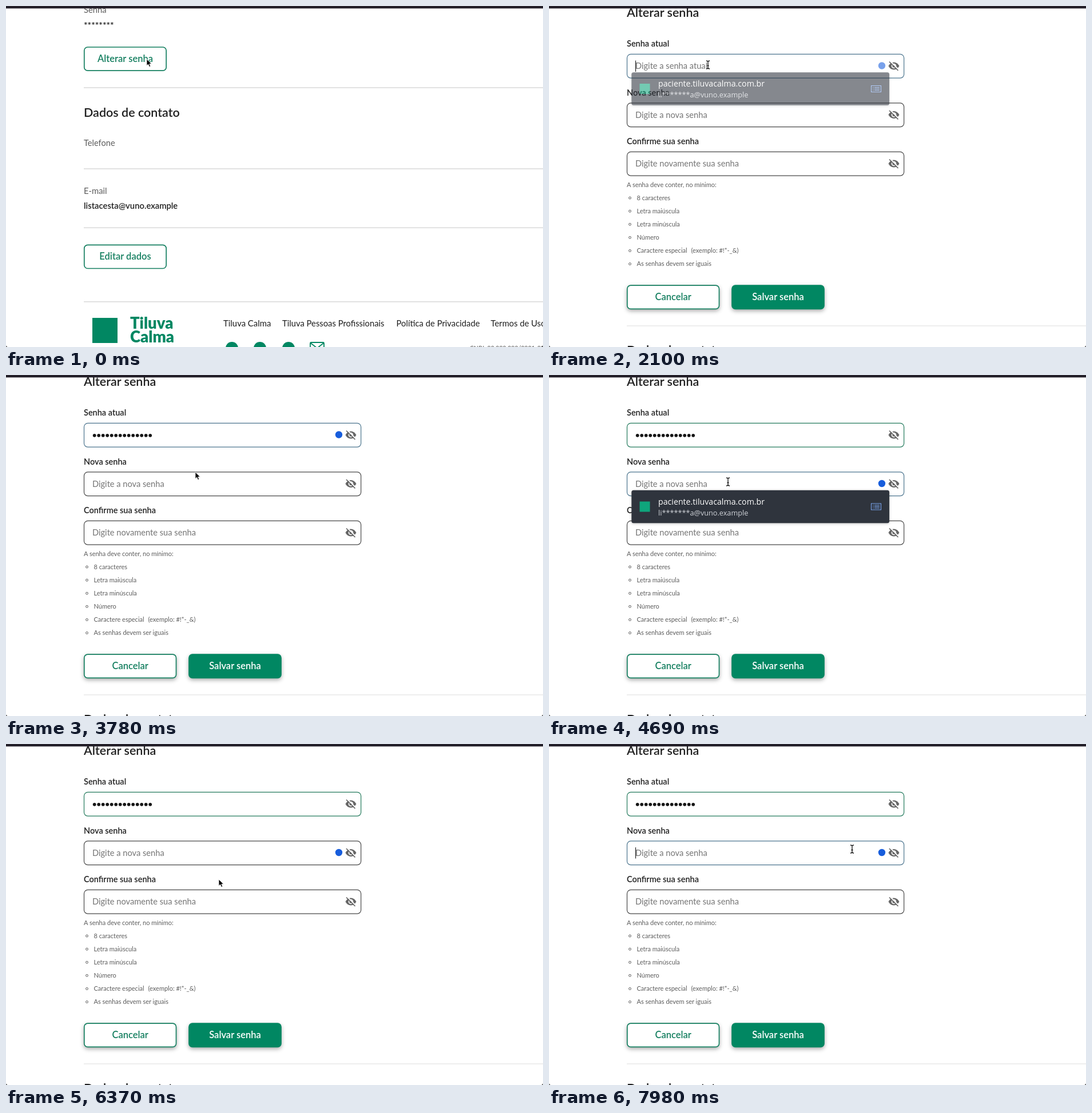
Write an HTML page that moves like this. It is 939 px wide and 597 px high and loops after 8 s.

```html
<!DOCTYPE html>
<html lang="pt-BR">
<head>
<meta charset="utf-8">
<style>
  html, body { margin: 0; width: 100%; height: 100%; overflow: hidden; background: #fff; }
  svg { display: block; width: 939px; height: 597px; }
  text { font-family: Lato, "Open Sans", sans-serif; fill: #1f1f1f; white-space: pre; }
  .b { font-weight: 600; }
  .gray { fill: #5c5c5c; }
  .hint { fill: #757575; }
  .green { fill: #018762; }
  .pop text { font-family: "Open Sans", "Noto Sans", sans-serif; }
  .lift { filter: drop-shadow(0 3px 3.5px rgba(0, 0, 0, .32)); }
  .pop .lift { filter: drop-shadow(0 1px 2px rgba(0, 0, 0, .25)); }
</style>
</head>
<body>
<svg id="stage" viewBox="0 0 939 597"></svg>
<script>
const LOOP = 8000, GREEN = '#018762', EDGE = '#157f60', GAP = 85.5;

const text = (x, y, size, str, cls = '', more = '') =>
  `<text x="${x}" y="${y}" font-size="${size}" class="${cls}" ${more}>${str}</text>`;
const box = (x, y, w, h, r, more) =>
  `<rect x="${x}" y="${y}" width="${w}" height="${h}" rx="${r}" ${more}/>`;
const rule = (y, color = '#d9d9d9') =>
  `<path d="M136 ${y}H939" stroke="${color}" stroke-width="1.4"/>`;
const button = (x, y, w, label, fill = '#fff', edge = EDGE, color = EDGE) =>
  box(x, y, w, 41.2, 6, `fill="${fill}" stroke="${edge}" stroke-width="1.7"`) +
  text(x + w / 2, y + 26, 16.5, label, 'b', `text-anchor="middle" style="fill:${color}"`);

const profile = `<g id="profile">
  ${text(136, 12, 14.8, 'Senha', 'gray')}
  ${text(136, 39, 15.5, '********', 'b')}
  ${button(136.8, 72, 143.4, 'Alterar senha')}
  ${rule(143)}${rule(285)}${rule(388.3)}${rule(517.8)}
  ${text(136, 194, 21.5, 'Dados de contato', 'b')}
  ${text(136, 244.5, 14.6, 'Telefone', 'gray')}
  ${text(136, 329, 14.8, 'E-mail', 'gray')}
  ${text(136, 355, 14.8, 'listacesta@vuno.example', 'b')}
  ${button(136.8, 418.3, 143.4, 'Editar dados')}
  ${box(151, 546, 44, 44, 0, `fill="${GREEN}"`)}
  ${text(217, 564.5, 27.5, 'Tiluva', 'green', 'font-weight="900"')}
  ${text(217, 588.5, 27.5, 'Calma', 'green', 'font-weight="900"')}
  ${text(380, 561, 14.9, 'Tiluva Calma')}
  ${text(483, 561, 14.8, 'Tiluva Pessoas Profissionais')}
  ${text(682.5, 561, 14.8, 'Política de Privacidade')}
  ${text(847.5, 561, 14.8, 'Termos de Uso')}
  ${[395, 444, 494].map(x => `<circle cx="${x}" cy="599" r="11" fill="${GREEN}"/>`).join('')}
  <path d="M532 600V590.500Q532 589 533.500 589H554.500Q556 589 556 590.500V600M532.500 590L544 599L555.500 590"
    fill="none" stroke="${GREEN}" stroke-width="1.8"/>
  ${text(811, 603, 10.6, 'CNPJ: 00.000.000/0001-00', 'gray')}
</g>`;

const eye = `<g fill="#666">
  <path d="M593.500 105Q597 98.500 603 98.500T612.500 105Q609 111.500 603 111.500T593.500 105Z"/>
  <circle cx="603" cy="105" r="4.300" fill="#fff"/><circle cx="603" cy="105" r="2.600"/>
  <path d="M596.500 96.500L612 112" stroke="#fff" stroke-width="1.800"/>
  <path d="M595 97.500L610.500 113" stroke="#666" stroke-width="1.700"/></g>`;

const field = ([label, hint], i) => `<g transform="translate(0 ${GAP * i})">
  ${text(136, 71, 14.5, label, 'b')}
  ${box(136.5, 84.4, 484.2, 41.8, 6.5, `id="edge${i}" fill="#fff" stroke-width="1.2"`)}
  ${text(151, 110, 14.65, hint, 'hint', `id="hint${i}"`)}${eye}</g>`;

const rules = ['8 caracteres', 'Letra maiúscula', 'Letra minúscula', 'Número',
  'Caractere especial', 'As senhas devem ser iguais'];
const dots = Array.from({ length: 14 }, (_, i) =>
  `<circle cx="${154.7 + i * 7.5}" cy="105.800" r="2.900" fill="#151515"/>`).join('');

const form = `<g id="form">
  ${text(136, 19, 21.5, 'Alterar senha', 'b')}
  ${[['Senha atual', 'Digite a senha atual'], ['Nova senha', 'Digite a nova senha'],
     ['Confirme sua senha', 'Digite novamente sua senha']].map(field).join('')}
  <g id="dots">${dots}</g>
  ${text(136, 316.8, 11, 'A senha deve conter, no mínimo:', 'gray')}
  ${rules.map((s, i) => {
    const y = 336 + i * 23.1;
    return `<circle cx="141.500" cy="${y}" r="1.900" fill="none" stroke="#555"/>` +
      text(153.5, y + 3.8, 11, s, 'gray');
  }).join('')}
  ${text(248.5, 432.2, 11, '(exemplo: #!*-_&amp;)', 'gray')}
  <g class="lift">${button(136.8, 489.2, 160.7, 'Cancelar')}</g>
  <g class="lift">${button(320, 489.2, 161, 'Salvar senha', GREEN, GREEN, '#fff')}</g>
  ${rule(560, '#e8e8e8')}
  ${text(136, 610, 21.5, 'Dados de contato', 'b')}
  <circle id="badge" cx="582" cy="104.500" r="6.200" fill="#175ddc"/>
  <path id="caret" d="M151.500 95.500V115" stroke="#222" stroke-width="1.200"/>
  <g id="popup" class="pop">
    ${box(144.3, 116.2, 450.8, 57.5, 3.5, 'fill="#2f343d" class="lift"')}
    ${box(158.5, 136, 18, 18, 0, 'fill="#0fa57c"')}
    ${text(191, 141, 14.2, 'paciente.tiluvacalma.com.br', '', 'style="fill:#fff"')}
    ${text(191, 160.4, 12.7, 'li*******a@vuno.example', '', 'style="fill:#cfd2d8"')}
    <path d="M563.500 139.500H580.500V150.500H563.500ZM566 142.500H567.500M569 142.500H578M566 145H567.500M569 145H578M566 147.500H567.500M569 147.500H578"
      fill="none" stroke="#7aa5f0" stroke-width="1.100"/>
  </g>
</g>`;

const pointers = `
  <path id="arrow" d="M0 0V11.500L2.700 9L4.600 13.500L6.700 12.600L4.800 8.300H8.500Z" fill="#000" stroke="#fff" stroke-width=".8"/>
  <g id="beam" fill="none">
    <path d="M-3-7Q0-7 0-5V5Q0 7-3 7M3-7Q0-7 0-5M0 5Q0 7 3 7M-1.500 1.500H1.500" stroke="#111" stroke-width="1.300"/>
  </g>
  <path id="hand" d="M-1.300 1Q0-.8 1.300 1V5L7 6.500Q8.500 7 8.200 9L7.200 13.500H.5L-3.500 8.800Q-3.800 7-1.300 8.300Z" fill="#fff" stroke="#000" stroke-width=".9"/>`;

document.getElementById('stage').innerHTML = profile + form +
  '<rect width="939" height="4.300" fill="#231f29"/>' +
  '<path d="M0 594.500V597H2.500ZM939 594.500V597H936.500Z" fill="#555"/>' + pointers;

const el = id => document.getElementById(id);
const show = (id, on) => el(id).style.display = on ? '' : 'none';
const within = (t, spans) => spans.some(([a, b]) => t >= a && t < b);
const ramp = (t, a) => Math.min(1, Math.max(0, (t - a) / 140));

// Pointer hot spot: time, x, y
const route = [[0, 246, 93], [1680, 246, 93], [1890, 278, 103], [2660, 278, 103], [2920, 190, 140],
  [3080, 112, 150], [3360, 300, 164], [3570, 300, 164], [3780, 331, 170], [3990, 313, 187],
  [5180, 313, 187], [5460, 452, 160], [5740, 440, 180], [5880, 440, 180], [6160, 372, 237],
  [6370, 372, 237], [6580, 395, 195], [6860, 414, 221], [7140, 120, 225], [7210, 120, 225],
  [7350, 112, 222], [7840, 530, 184], [LOOP, 530, 184]];

function pointerAt(t) {
  const i = route.findIndex(p => p[0] > t);
  const [a, b] = [route[i - 1], route[i]];
  const u = (t - a[0]) / (b[0] - a[0]), k = u * u * (3 - 2 * u);
  return [a[1] + (b[1] - a[1]) * k, a[2] + (b[2] - a[2]) * k];
}

const popups = [[2020, 2960], [4220, 6090], [6620, 7260]];
const focus = [[[1890, 4130]], [[4130, 6160], [6580, 7300], [7700, LOOP]]];
const caretOn = [[1960, 2520], [4150, 4690], [5180, 5670], [6600, 7140], [7700, LOOP]];

function draw(t) {
  const onForm = t >= 490, filled = t >= 2980, row = t < 4130 ? 0 : 1;
  const shift = `translate(0 ${GAP * row})`;
  const alpha = Math.max(...popups.map(([a, b]) => ramp(t, a) * (1 - ramp(t, b))));
  show('profile', !onForm);
  show('form', onForm);
  show('dots', filled);
  show('hint0', !filled);
  for (let i = 0; i < 3; i++) {
    const active = focus[i] && within(t, focus[i]);
    const valid = i === 0 && t >= 4130;
    el('edge' + i).setAttribute('stroke', active ? '#4b748e' : valid ? '#237a5c' : '#484848');
  }
  for (const id of ['badge', 'caret', 'popup']) el(id).setAttribute('transform', shift);
  el('badge').setAttribute('opacity', ramp(t, 2020));
  el('popup').setAttribute('opacity', alpha);
  show('caret', within(t, caretOn));

  const [x, y] = pointerAt(t), py = y - GAP * row;
  const overPopup = alpha > .6 && x > 145 && x < 595 && py > 117 && py < 173;
  const inRow = (y - 84.4) % GAP;
  const overField = onForm && x > 137 && x < 620 && y > 85 && inRow > 1 && inRow < 42;
  const kind = overPopup ? 'hand' : overField ? 'beam' : 'arrow';
  for (const id of ['arrow', 'beam', 'hand']) show(id, id === kind);
  el(kind).setAttribute('transform', `translate(${x} ${y})`);
}

function tick(now) {
  draw(now % LOOP);
  requestAnimationFrame(tick);
}
draw(0);
requestAnimationFrame(tick);
</script>
</body>
</html>
```
